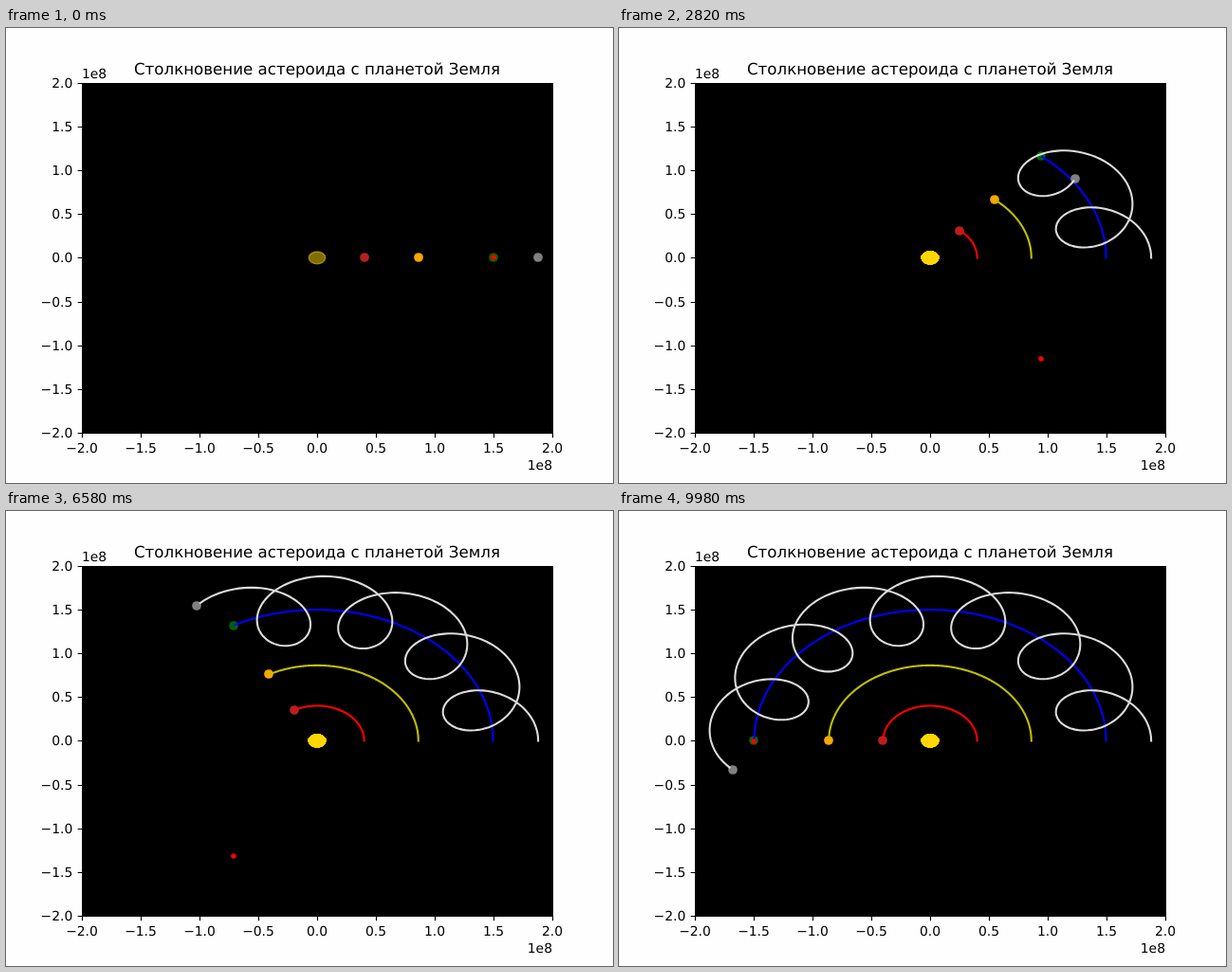
Recreate the animation shown at these times as an HTML page with a canvas. Size 640x480 px, loop 10000 ms.

```html
<!DOCTYPE html>
<html lang="ru">
<head>
<meta charset="utf-8">
<title>Столкновение астероида</title>
<style>
  html, body { margin: 0; width: 100%; height: 100%; overflow: hidden; background: #fefefe; }
  svg, canvas { position: absolute; left: 0; top: 0; width: 640px; height: 480px; }
  text { font: 13.889px "DejaVu Sans", sans-serif; text-rendering: geometricPrecision; }
  .title { font-size: 16.667px; }
  .mid { text-anchor: middle; }
  .end { text-anchor: end; }
</style>
</head>
<body>
<svg viewBox="0 0 640 480">
  <rect x="80" y="58" width="497" height="370"/>
  <text class="title mid" x="328" y="49">Столкновение астероида с планетой Земля</text>
  <text x="80" y="53">1e8</text>
  <text class="end" x="576" y="466">1e8</text>
  <g id="axes"></g>
</svg>
<canvas id="sky" width="640" height="480"></canvas>
<script>
const STEPS = 500, STEP_MS = 20;
const MOON_RATE = 13.37, MOON_DIST = 0.384;
const PT = 100 / 72;

// Axis units are 1e8 km
const px = x => 328 + 124 * x;
const py = y => 242.4 - 92.4 * y;

function buildAxes() {
  let out = '';
  for (let v = -2; v <= 2; v += 0.5) {
    const x = Math.round(px(v)) + 0.5, y = Math.round(py(v)) + 0.5;
    const label = v.toFixed(1).replace('-', '\u2212');
    out += `<path d="M${x} 427.5v4.86M80.5 ${y}h-4.86" stroke="#000" stroke-width="1.11"/>
      <text class="mid" x="${px(v)}" y="448">${label}</text>
      <text class="end" x="70.3" y="${py(v) + 5}">${label}</text>`;
  }
  document.getElementById('axes').innerHTML = out;
}

const angle = i => Math.PI * i / STEPS;
const orbit = r => i => [r * Math.cos(angle(i)), r * Math.sin(angle(i))];
const earth = orbit(1.496);
const moon = i => {
  const [x, y] = earth(i), a = MOON_RATE * angle(i);
  return [x + MOON_DIST * Math.cos(a), y + MOON_DIST * Math.sin(a)];
};
const asteroid = i => {
  const [x, y] = earth(i);
  return [x, -y];
};

const bodies = [
  { at: orbit(0.4), fill: '#b22222', trail: '#ff0000' },
  { at: orbit(0.861), fill: '#ffa500', trail: '#bfbf00' },
  { at: earth, fill: '#006400', trail: '#0000ff' },
  { at: moon, fill: '#808080', trail: '#dcdcdc' },
  { at: asteroid, fill: '#ff0000', size: 3 }
];

const ctx = document.getElementById('sky').getContext('2d');

// The translucent disc is painted once more on every step, so it builds up
function drawSun(i) {
  ctx.globalAlpha = 0.5;
  ctx.fillStyle = ctx.strokeStyle = '#ffd700';
  ctx.lineWidth = PT;
  ctx.beginPath();
  ctx.ellipse(px(0), py(0), 124 * 0.07, 92.4 * 0.07, 0, 0, 2 * Math.PI);
  for (let n = Math.min(i, 50); n >= 0; n--) {
    ctx.fill();
    ctx.stroke();
  }
  ctx.globalAlpha = 1;
}

function drawBody({ at, fill, trail, size = 6 }, i) {
  const [x, y] = at(i);
  ctx.fillStyle = fill;
  ctx.beginPath();
  ctx.arc(Math.round(px(x)), Math.round(py(y)), (size + 1) / 2 * PT, 0, 2 * Math.PI);
  ctx.fill();
  if (!trail || i < 2) return;
  ctx.strokeStyle = trail;
  ctx.lineWidth = 1.5 * PT;
  ctx.lineCap = 'square';
  ctx.lineJoin = 'round';
  ctx.beginPath();
  for (let k = 0; k < i; k++) {
    const [tx, ty] = at(k);
    ctx.lineTo(px(tx), py(ty));
  }
  ctx.stroke();
}

function draw(ms) {
  const i = Math.floor(ms / STEP_MS + 0.001) % STEPS;
  ctx.clearRect(0, 0, 640, 480);
  drawSun(i);
  for (const body of bodies) drawBody(body, i);
}

buildAxes();
const start = performance.now();
function tick() {
  draw(performance.now() - start);
  requestAnimationFrame(tick);
}
tick();
</script>
</body>
</html>
```
